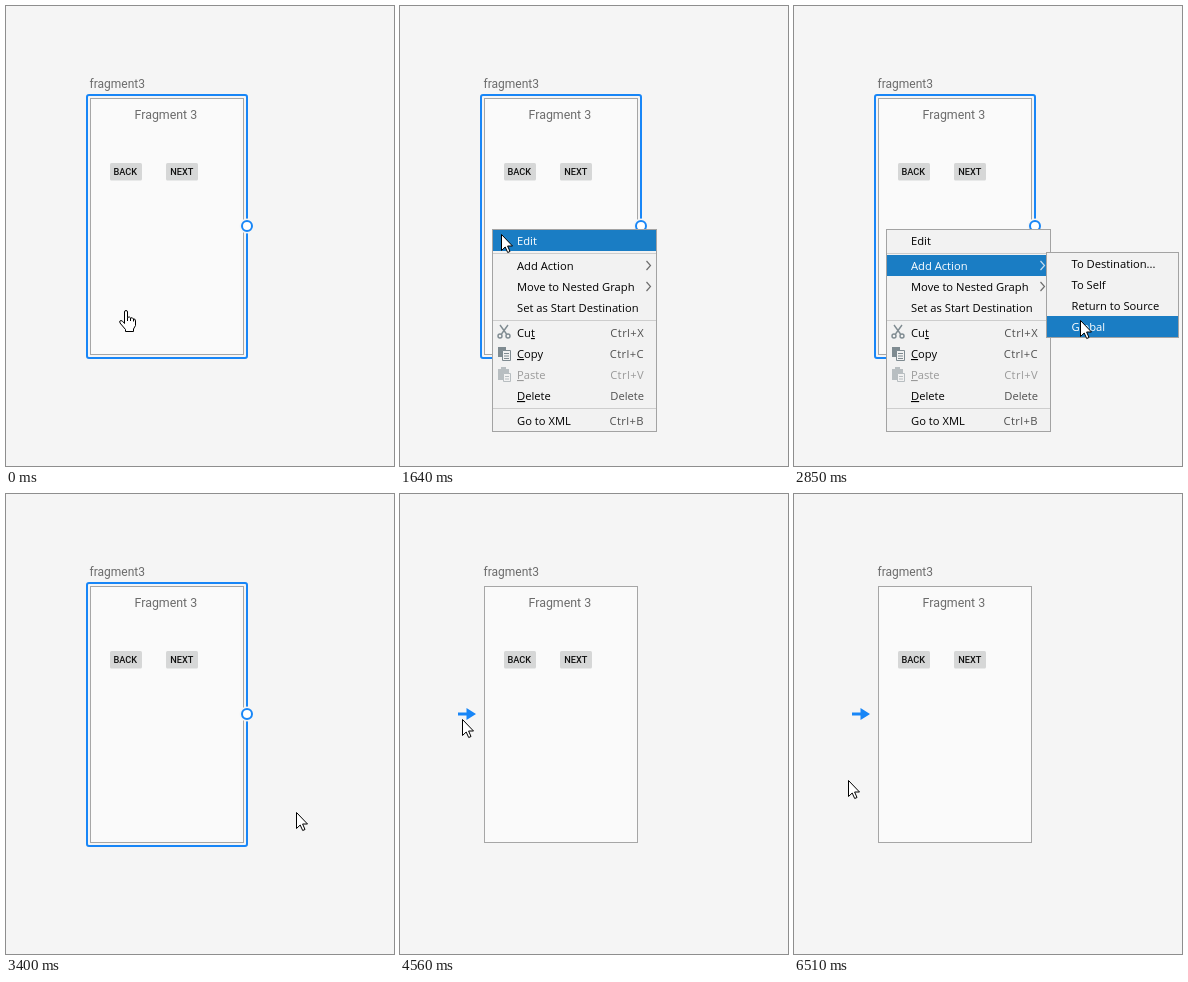
Recreate the animation shown at these times as an HTML page. Size 388x460 px, loop 7.57 s.

```html
<!DOCTYPE html>
<html lang="en">
<head>
<meta charset="utf-8">
<title>Adding a global action</title>
<style>
html, body { margin: 0; width: 100%; height: 100%; overflow: hidden; background: #f5f5f5; }
svg { display: block; width: 388px; height: 460px; }
.off { display: none; }
.roboto { font-family: Roboto, sans-serif; fill: #6c6c6c; }
.btn text { font: 500 9.2px Roboto, sans-serif; fill: #111; }
.btn rect { fill: #d6d7d7; }
.panel { fill: #f2f2f2; stroke: #a3a3a3; }
.rule { stroke: #cdcdcd; }
.menu text { font: 11.2px "Open Sans", sans-serif; fill: #000; }
.menu .key { fill: #505050; text-anchor: end; }
.menu .ctrl { letter-spacing: .4px; }
.menu .dim text { fill: #9a9a9a; }
.menu u, .menu .u { text-decoration: underline; }
.bar { fill: none; }
.hot .bar { fill: #1a7dc4; }
.menu .hot text { fill: #fff; }
.chev { fill: none; stroke: #6e6e6e; stroke-width: 1.2; }
.hot .chev { stroke: #c5dcee; }
.icon { fill: none; stroke: #7f8b91; stroke-width: 1.4; }
.dim .icon { opacity: .5; }
.icon .solid { fill: #7f8b91; stroke: none; }
.icon .page { fill: #f2f2f2; stroke-width: 1; }
.cursor { fill: #fff; stroke: #000; stroke-linejoin: round; }
</style>
</head>
<body>
<svg viewBox="0 0 388 460">
  <rect width="388" height="460" fill="#f5f5f5"/>
  <text class="roboto" x="83.5" y="82" font-size="12">fragment3</text>
  <rect x="84.5" y="92.5" width="153" height="256" fill="#fafafa" stroke="#a6a6a6"/>
  <text class="roboto" x="128.5" y="113" font-size="12.4">Fragment 3</text>
  <g class="btn">
    <rect x="104" y="157" width="32" height="17.5" rx="1.5"/>
    <text x="107.5" y="169">BACK</text>
    <rect x="160" y="157" width="32" height="17.5" rx="1.5"/>
    <text x="164.2" y="169">NEXT</text>
  </g>
  <rect id="frame" x="81" y="89" width="160" height="263" rx="2" fill="none" stroke-width="2"/>
  <g id="port">
    <circle cx="241" cy="220" r="7.5" fill="#f5f5f5"/>
    <circle cx="241" cy="220" r="5" fill="#fff" stroke="#1886f7" stroke-width="2"/>
  </g>
  <path id="entry" fill="#1886f7" d="M58 218.5h8.500v-4.500l9.500 6-9.500 6v-4.500h-8.500z"/>
  <g id="menu" class="menu"></g>
  <g id="sub" class="menu"></g>
  <circle id="click" r="12" fill="#ff0" fill-opacity=".47" stroke="#000" stroke-opacity=".47"/>
  <path id="arrow" class="cursor" d="M.5 .5V16.500L4.200 13 6.700 18.500 9 17.500 6.600 12H11.500Z"/>
  <g id="hand" class="cursor">
    <path d="M.5 13.500V2Q.5 .5 2 .5T3.500 2V7.500Q5.500 6 6.500 8 8.500 7 9.500 9 11.500 8.500 11.500 11V15.500L9.500 19V21.500H1.500V19.500L-4 13Q-5 10.500 -3 10.500 -1.500 10.500 .5 13.500Z"/>
    <path fill="none" d="M3.500 7.500V11M6.500 8V11M9.500 9V11.500"/>
  </g>
</svg>
<script>
const LOOP = 7570;
const $ = id => document.getElementById(id);

const ICONS = {
  cut: '<path d="M100 319l6.500 9M108 319l-6.500 9"/><circle cx="100" cy="330" r="2"/><circle cx="108" cy="330" r="2"/>',
  copy: '<path class="solid" d="M98 341h8v10h-8z"/><path class="page" d="M102.500 344.500h8v10h-8z"/><path d="M104 347.500h5M104 350h5M104 352.500h5" stroke-width="1"/>',
  paste: '<path class="solid" d="M98 363h3v-2h5v2h3v11h-11z"/><path class="page" d="M103.500 367.500h7v8h-7z"/><path d="M105 370.500h4M105 373h4" stroke-width="1"/>'
};

// top edge, label, shortcut, extras; "_" marks the mnemonic letter
const MENU = [
  [224, 'Edit'],
  [249, 'Add Action', '', { more: 1 }],
  [270, 'Move to Nested Graph', '', { more: 1 }],
  [291, 'Set as Start Destination'],
  [316, 'Cu_t', 'Ctrl+X', { icon: 'cut' }],
  [337, '_Copy', 'Ctrl+C', { icon: 'copy' }],
  [358, '_Paste', 'Ctrl+V', { icon: 'paste', dim: 1 }],
  [379, '_Delete', 'Delete'],
  [404, 'Go to XML', 'Ctrl+B']
];
const SUB = [[247, 'To Destination...'], [268, 'To Self'], [289, 'Return to Source'], [310, 'Global']];

function row(left, width, textX, [y, label, key = '', { more, icon, dim } = {}]) {
  const text = label.replace(/_(.)/, '<tspan class="u">$1</tspan>');
  return `<g class="row${dim ? ' dim' : ''}">
    <rect class="bar" x="${left}" y="${y}" width="${width}" height="21"/>
    ${icon ? `<g class="icon">${ICONS[icon]}</g>` : ''}
    <text x="${textX}" y="${y + 15}">${text}</text>
    <text class="key${key.startsWith('Ctrl') ? ' ctrl' : ''}" x="244" y="${y + 15}">${key}</text>
    ${more ? `<path class="chev" d="M246.500 ${y + 6}l4 4.500-4 4.500"/>` : ''}</g>`;
}

$('menu').innerHTML = '<rect class="panel" x="92.500" y="223.500" width="164" height="202"/>' +
  [247, 314, 402].map(y => `<path class="rule" d="M93 ${y}.500h163"/>`).join('') +
  MENU.map(r => row(93, 163, 117, r)).join('');
$('sub').innerHTML = '<rect class="panel" x="252.500" y="246.500" width="132" height="85"/>' +
  SUB.map(r => row(253, 131, 277.5, r)).join('');

// first step, last step, number of steps, target x, target y, slow arrival
const MOVES = [
  [30, 210, 5, 103, 242],
  [350, 720, 8, 92, 223, 1],
  [1640, 1640, 1, 101, 228],
  [1690, 1960, 7, 190, 253, 1],
  [2430, 2430, 1, 192, 253],
  [2480, 2620, 4, 256, 262],
  [2670, 2850, 5, 286, 314],
  [2900, 3020, 3, 290, 318],
  [3910, 4170, 7, 111, 270],
  [4220, 4660, 10, 57, 221, 1],
  [5390, 5390, 1, 58, 221],
  [5590, 5770, 4, 65, 221],
  [6330, 6510, 5, 54, 286]
];
const CLICKS = [[1130, 1200], [3250, 3400], [5860, 6000]];

const during = (t, [a, b]) => t >= a && t < b;
const show = (id, on) => $(id).classList.toggle('off', !on);

function pointer(t) {
  let x = 118, y = 304;
  for (const [from, to, n, tx, ty, slow] of MOVES) {
    if (t < from) break;
    const step = n > 1 ? (to - from) / (n - 1) : 1;
    let p = Math.min(n, Math.floor((t - from) / step + 1e-6) + 1) / n;
    if (slow) p *= 2 - p;
    x += (tx - x) * p;
    y += (ty - y) * p;
  }
  return [Math.round(x), Math.round(y)];
}

function highlight(id, rows, active) {
  $(id).querySelectorAll('.row').forEach((el, i) =>
    el.classList.toggle('hot', active(rows[i][0], i)));
}

function draw(t) {
  const [x, y] = pointer(t);
  const selected = t < 3530;
  const inside = x >= 80 && x <= 242 && y >= 88 && y <= 353;
  const menu = during(t, [1270, 3400]);
  const sub = during(t, [2000, 3400]);
  const inSub = sub && x >= 253;
  const hand = inside && !menu;
  const over = top => y >= top && y < top + 21;

  $('frame').setAttribute('stroke', selected ? '#1886f7' : '#a6a6a6');
  show('frame', selected || inside);
  show('port', selected);
  show('entry', !selected);
  show('menu', menu);
  show('sub', sub);
  highlight('menu', MENU, (top, i) => inSub ? i === 1 : t >= 1640 && over(top));
  highlight('sub', SUB, top => inSub && over(top));

  show('click', CLICKS.some(c => during(t, c)));
  show('hand', hand);
  show('arrow', !hand);
  $('click').setAttribute('transform', `translate(${x + .5} ${y + .5})`);
  for (const id of ['hand', 'arrow']) $(id).setAttribute('transform', `translate(${x} ${y})`);
}

const start = performance.now();
function tick() {
  draw((performance.now() - start) % LOOP);
  requestAnimationFrame(tick);
}
tick();
</script>
</body>
</html>
```
